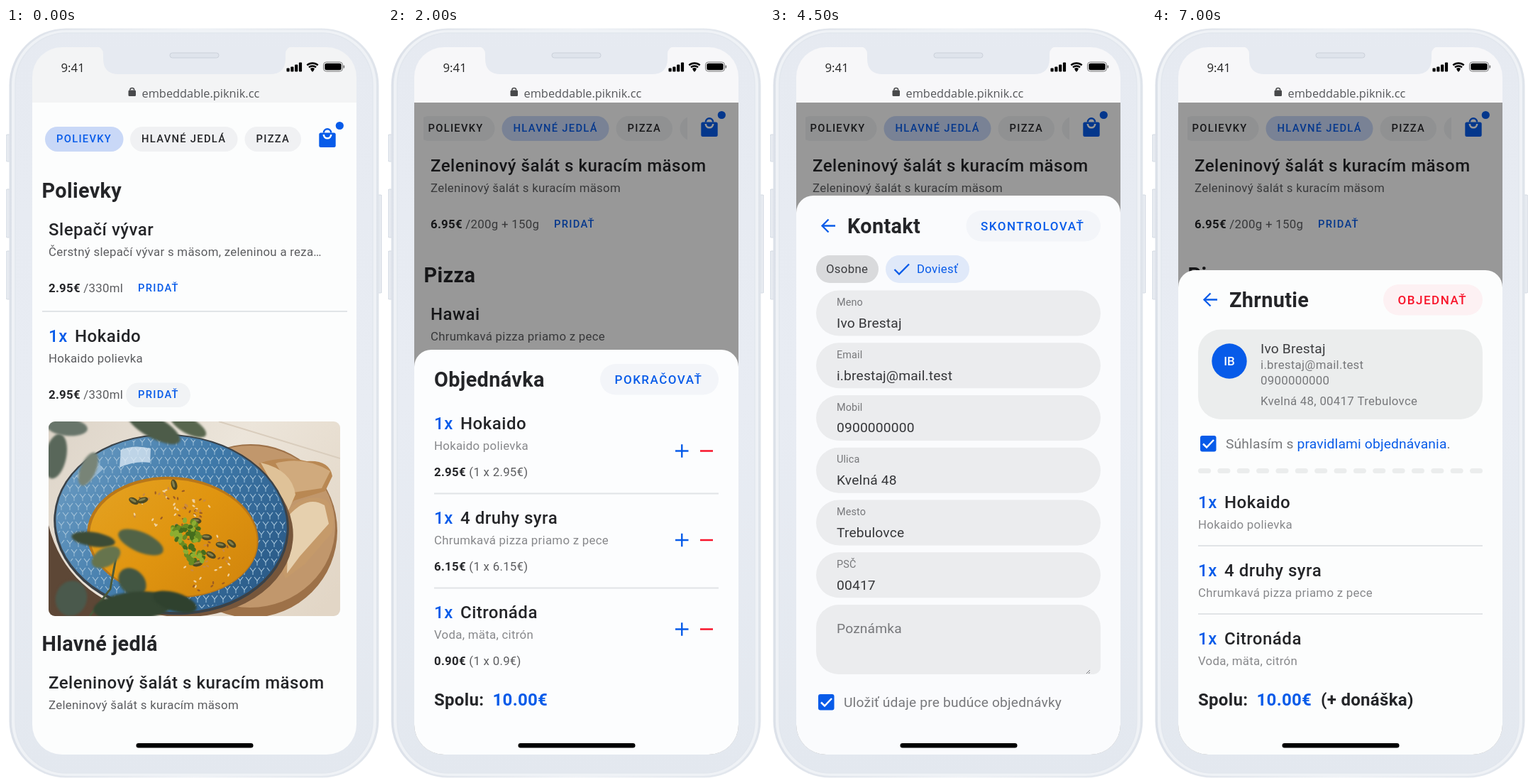
These frames come from a looping animation (530 px wide and 1056 px high, 8000 ms). An HTML page with a canvas:

```html
<!DOCTYPE html>
<html lang="sk">
<head>
<meta charset="utf-8">
<title>Objednávka</title>
<style>
html, body { margin: 0; width: 100%; height: 100%; overflow: hidden; background: #fff; }
canvas { display: block; width: 530px; height: 1056px; }
</style>
</head>
<body>
<canvas id="stage" width="530" height="1056"></canvas>
<script>
const ctx = document.getElementById('stage').getContext('2d');
const BLUE = '#075be9', RED = '#f8142a', INK = '#242528', MUTED = '#5b5c5f', PALE = '#87888b';

// [weight, size, letter spacing in em, family]
const STYLE = {
  head: [700, 28.8, .0125], title: [500, 24, .021], total: [700, 24, .0125],
  body: [400, 16.8, .0178], strong: [700, 16.8, .0178],
  chip: [500, 14.7, .089], button: [500, 17, .089],
  field: [400, 19.2, .0094], label: [400, 14.4, .009],
  initials: [500, 17, 0], bar: [400, 16.35, 0, '"Open Sans"'], clock: [400, 16.8, 0, '"Open Sans"']
};

// y is the middle of the capitals; returns the x where the text ends
function text(str, x, y, style, color = INK) {
  const [weight, size, spacing, family = 'Roboto'] = STYLE[style];
  ctx.font = `${weight} ${size}px ${family}, sans-serif`;
  ctx.letterSpacing = `${spacing * size}px`;
  ctx.fillStyle = color;
  ctx.fillText(str, x, y + size * .356);
  return x + ctx.measureText(str).width;
}

function box(x, y, w, h, r, fill) {
  ctx.beginPath();
  ctx.roundRect(x, y, w, h, r);
  if (fill) { ctx.fillStyle = fill; ctx.fill(); }
}

function oval(x, y, rx, ry, turn, fill) {
  ctx.beginPath();
  ctx.ellipse(x, y, rx, ry, turn, 0, 7);
  if (fill) { ctx.fillStyle = fill; ctx.fill(); }
}

function line(points, color, width, cap = 'butt') {
  ctx.beginPath();
  points.forEach(([x, y]) => ctx.lineTo(x, y));
  ctx.strokeStyle = color;
  ctx.lineWidth = width;
  ctx.lineCap = cap;
  ctx.stroke();
}

function arc(x, y, r, from, to, color, width) {
  ctx.beginPath();
  ctx.arc(x, y, r, from, to);
  ctx.strokeStyle = color;
  ctx.lineWidth = width;
  ctx.lineCap = 'butt';
  ctx.stroke();
}

function shape(path, fill) {
  ctx.fillStyle = fill;
  ctx.fill(new Path2D(path));
}

function gradient(x0, y0, x1, y1, ...colors) {
  const g = ctx.createLinearGradient(x0, y0, x1, y1);
  colors.forEach((c, i) => g.addColorStop(i / (colors.length - 1), c));
  return g;
}

function clipped(x, y, w, h, r, draw) {
  ctx.save();
  box(x, y, w, h, r);
  ctx.clip();
  draw();
  ctx.restore();
}

function random(seed) {
  return () => (seed = seed * 16807 % 2147483647) / 2147483647;
}

// ---- phone ----
function phoneBody() {
  ctx.fillStyle = '#fff';
  ctx.fillRect(0, 0, 530, 1056);
  for (const [x, y, h] of [[0, 150, 38], [0, 227, 68], [0, 314, 68], [523, 235, 138]]) {
    box(x, y, 7, h, 2, '#e6eaf0');
    ctx.strokeStyle = '#d5dbe3';
    ctx.lineWidth = 1;
    ctx.stroke();
  }
  box(4.5, .5, 521, 1055, 80, gradient(5, 0, 526, 0, '#dce1e9', '#eff2f6', '#dfe4eb'));
  box(8, 3, 514, 1050, 77, '#eff2f6');
  box(13, 7, 504, 1042, 73, gradient(0, 0, 0, 1056, '#e6eaf1', '#e8ecf3', '#e3e8ef'));
  ctx.strokeStyle = '#e2e7ee';
  ctx.lineWidth = 1.5;
  ctx.stroke();
}

function notch() {
  shape('M127 26 H404 Q394 27 394 37 V43 Q394 65 372 65 H159 Q137 65 137 43 V37 Q137 27 127 26Z', '#e6eaf1');
  box(231, 35, 69, 7, 3.5, '#dfe4ec');
  ctx.strokeStyle = '#cbd1db';
  ctx.lineWidth = 1;
  ctx.stroke();
}

function statusBar(fill) {
  ctx.fillStyle = fill;
  ctx.fillRect(37, 27, 457, 78);
  text('9:41', 77.5, 56.5, 'clock', '#222');
  [5, 7, 10, 13].forEach((h, i) => box(395.5 + i * 5.8, 61.5 - h, 4.2, h, 1, '#000'));
  for (const r of [4.5, 8.5, 12.5]) arc(432, 61, r - 1, -2.3, -.84, '#000', 2.5);
  shape('M432 62 L429.6 59 Q432 57 434.4 59Z', '#000');
  box(447.5, 48, 27, 13, 4);
  ctx.strokeStyle = '#777';
  ctx.lineWidth = 1;
  ctx.stroke();
  box(449.3, 49.8, 23.4, 9.4, 2.5, '#000');
  box(475.5, 52.5, 1.7, 4, 1, '#777');
  box(172.5, 87.5, 10.5, 8.5, 1.5, '#48494b');
  arc(177.75, 87.5, 3, Math.PI, 0, '#48494b', 1.6);
  text('embeddable.piknik.cc', 191.5, 91.7, 'bar', '#55575a');
}

// ---- shared widgets ----
function chip(label, x, y, w, active) {
  box(x, y - 17.5, w, 35, 17.5, active ? '#c9d8f7' : '#f0f1f3');
  text(label, x + 16, y - .3, 'chip', active ? BLUE : INK);
}

function bag(y) {
  box(441.3, y - 7.5, 23.4, 20.6, 2.5, BLUE);
  arc(453, y - 7.5, 5.2, Math.PI, 0, BLUE, 2.6);
  arc(453, y - 4.9, 5.2, 0, Math.PI, '#fcfdfd', 2.6);
  oval(470.3, y - 17.5, 5.6, 5.6, 0, BLUE);
}

function price(amount, unit, x, y) {
  return text(unit, text(`${amount}€ `, x, y, 'strong'), y, 'body', MUTED);
}

function dish(name, note, x, y, counted, noteColor = MUTED) {
  if (counted) text('1x', x, y, 'title', BLUE);
  text(name, counted ? x + 37 : x, y, 'title');
  text(note, x, y + 32, 'body', noteColor);
}

function rule(x, y, w) {
  ctx.fillStyle = '#e1e4e7';
  ctx.fillRect(x, y - 1, w, 2);
}

function sheet(top, fill) {
  ctx.fillStyle = 'rgba(0,0,0,.4)';
  ctx.fillRect(37, 105, 457, 930);
  box(37, top, 457, 1030 - top, [24, 24, 0, 0], fill);
}

function sheetHead(title, y, label, x, color, fill, back) {
  box(x, y - 21.5, 466 - x, 43.5, 21.75, fill);
  text(label, x + 20.5, y, 'button', color);
  text(title, back ? 109 : 65, y, 'head');
  if (back) {
    line([[92, y], [74, y]], BLUE, 2.3);
    line([[82.5, y - 9], [73.5, y], [82.5, y + 9]], BLUE, 2.3);
  }
}

function checkbox(y) {
  box(68, y - 11.5, 22.5, 22.5, 3, BLUE);
  line([[72, y], [77, y + 5], [87, y - 5.5]], '#fff', 2.5);
}

function total(extra = '') {
  text('Spolu:', 65, 945, 'total');
  text('10.00€', 147.5, 945, 'total', BLUE);
  text(extra, 238, 945, 'total');
}

// ---- soup picture ----
function soupPicture() {
  const rnd = random(41);
  const spread = (x, y, rx, ry) => {
    const a = rnd() * 6.28, r = Math.sqrt(rnd());
    return [x + rx * r * Math.cos(a), y + ry * r * Math.sin(a)];
  };
  ctx.fillStyle = gradient(60, 554, 440, 828, '#ddd4c8', '#ece5da', '#e2d6c6');
  ctx.fillRect(60, 554, 411, 274);
  line([[300, 554], [471, 606]], '#d9cdbd', 2);
  oval(345, 708, 122, 122, 0, '#9d7148');
  oval(344, 702, 120, 114, 0, '#c1976c');
  shape('M60 700 Q85 800 200 828 H60Z', '#5d4736');

  // bread
  shape('M356 613 Q392 601 424 610 Q456 608 460 631 L450 652 L407 665 L386 681Z', '#b98853');
  shape('M380 613 Q420 602 457 624 L445 648 L405 654Z', '#d0aa7d');
  shape('M359 612 Q403 622 408 657 L397 682 L374 639Z', '#dfc298');
  shape('M397 680 Q422 653 452 665 Q466 681 459 711 L421 755 L394 775 Q382 752 390 726Z', '#c59a6a');
  shape('M399 686 Q425 657 449 672 L455 698 L414 744 L396 768Z', '#e6d0ae');

  // bowl
  oval(243, 708, 162, 121, .08, '#76563b');
  oval(233, 699, 166, 127, .08, '#3a4249');
  oval(233, 698, 163, 124, .08, gradient(80, 600, 390, 800, '#6a9bc2', '#3f79a9', '#275683'));
  ctx.save();
  oval(233, 698, 161, 122, .08);
  ctx.clip();
  for (let row = 0; row < 21; row++) {
    for (let col = 0; col < 30; col++) {
      const x = 66 + col * 12 + row % 2 * 6, y = 570 + row * 13;
      line([[x - 4, y - 5], [x, y], [x + 4, y - 5]], '#a3c2d8', 1.2);
      line([[x, y], [x, y + 5]], '#8fb5d0', 1.2);
    }
  }
  ctx.restore();
  shape('M162 594 Q180 586 204 592 L203 612 Q181 609 160 619Z', 'rgba(224,237,247,.75)');
  shape('M98 631 L126 606 L137 621 L113 643Z', 'rgba(210,229,243,.45)');
  oval(235, 717, 121, 85, .08, '#b8771a');
  oval(236, 718, 118, 82, .08, gradient(150, 640, 300, 800, '#e3a01f', '#e09510', '#d4880d'));

  // seeds and herbs
  for (let i = 0; i < 90; i++) {
    const [x, y] = i < 55 ? spread(232, 677, 58, 29) : spread(280, 752, 38, 42);
    oval(x, y, 2.3, 1.2, rnd() * 3, ['#f0d2a0', '#9c5c23', '#c98845'][i % 3]);
  }
  for (const [x, y, turn] of [[180, 666, .5], [193, 665, -.3], [237, 643, 1.3], [283, 717, .1], [318, 726, .7],
    [270, 754, -.2], [289, 742, .5], [303, 728, .2], [268, 694, .1]]) {
    oval(x, y, 7.5, 4.2, turn, '#4d4a25');
    oval(x - 1, y - 1, 5, 1.6, turn, '#85804a');
  }
  for (let i = 0; i < 65; i++) {
    const [x, y] = i < 45 ? spread(254, 712, 21, 20) : spread(266, 742, 17, 13);
    oval(x, y, 4, 3, rnd() * 3, ['#688b22', '#8cae31', '#456d1d'][i % 3]);
  }

  // leaves in front
  line([[157, 735], [147, 790], [118, 828]], '#4b5939', 3);
  ctx.filter = 'blur(1.5px)';
  for (const [x, y, rx, ry, turn, color] of [
    [123, 720, 31, 10, .15, '#3c4b35'], [190, 724, 34, 14, .4, '#526346'], [141, 745, 22, 13, -.5, '#66744d'],
    [178, 780, 22, 17, .8, '#425642'], [180, 814, 57, 20, -.1, '#344632'], [92, 803, 22, 25, .3, '#4a594c'],
    [238, 808, 32, 13, .3, '#2f412e'], [70, 603, 15, 32, .2, '#59675a'], [86, 562, 29, 12, .1, '#68756a'],
    [116, 621, 11, 25, .4, '#788477'], [208, 562, 42, 15, .5, '#4d5c49'], [257, 560, 28, 11, .5, '#58664e']
  ]) oval(x, y, rx, ry, turn, color);
  ctx.filter = 'none';
}

// ---- screens ----
function menuTop() {
  ctx.fillStyle = '#fcfdfd';
  ctx.fillRect(37, 105, 457, 930);
  chip('POLIEVKY', 55, 156.5, 110.5, true);
  chip('HLAVNÉ JEDLÁ', 175, 156.5, 151.5);
  chip('PIZZA', 336.5, 156.5, 79.5);
  bag(155);
  text('Polievky', 50.5, 229, 'head');
  dish('Slepačí vývar', 'Čerstný slepačí vývar s mäsom, zeleninou a reza…', 60, 283);
  price('2.95', '/330ml', 60, 366);
  text('PRIDAŤ', 186, 366, 'chip', BLUE);
  rule(51, 399, 430);
  dish('Hokaido', 'Hokaido polievka', 60, 433, true);
  price('2.95', '/330ml', 60, 516);
  box(169, 499.5, 91, 34.5, 17.25, '#f1f3f5');
  text('PRIDAŤ', 186, 516, 'chip', BLUE);
  clipped(60, 554, 411, 274, 9, soupPicture);
  text('Hlavné jedlá', 50.5, 867, 'head');
  dish('Zeleninový šalát s kuracím mäsom', 'Zeleninový šalát s kuracím mäsom', 60, 921);
}

function menuScrolled() {
  ctx.fillStyle = '#fcfdfd';
  ctx.fillRect(37, 105, 457, 930);
  clipped(50, 110, 372, 60, 0, () => {
    chip('POLIEVKY', 40.5, 141.5, 110);
    chip('HLAVNÉ JEDLÁ', 160.5, 141.5, 151, true);
    chip('PIZZA', 321.5, 141.5, 79.5);
    chip('', 411.5, 141.5, 90);
  });
  bag(140);
  dish('Zeleninový šalát s kuracím mäsom', 'Zeleninový šalát s kuracím mäsom', 60, 193);
  price('6.95', '/200g + 150g', 60, 276);
  text('PRIDAŤ', 234, 276, 'chip', BLUE);
  text('Pizza', 50.5, 348, 'head');
  dish('Hawai', 'Chrumkavá pizza priamo z pece', 60, 402);
}

const ORDER = [
  ['Hokaido', 'Hokaido polievka', '2.95', '2.95'],
  ['4 druhy syra', 'Chrumkavá pizza priamo z pece', '6.15', '6.15'],
  ['Citronáda', 'Voda, mäta, citrón', '0.90', '0.9']
];

function cart() {
  menuScrolled();
  sheet(453, '#fcfdfe');
  sheetHead('Objednávka', 494.5, 'POKRAČOVAŤ', 299, BLUE, '#f3f5f9');
  ORDER.forEach(([name, note, sum, each], i) => {
    const y = 556 + i * 133, mid = 595.5 + i * 125.5;
    dish(name, note, 65, y, true, PALE);
    price(sum, `(1 x ${each}€)`, 65, y + 69);
    if (i < 2) rule(65, y + 99.5, 401);
    line([[405, mid], [423.5, mid]], BLUE, 2.4);
    line([[414.25, mid - 9.25], [414.25, mid + 9.25]], BLUE, 2.4);
    line([[440, mid], [458, mid]], RED, 2.4);
  });
  total();
}

const PERSON = {
  name: 'Ivo Brestaj', initials: 'IB', email: 'i.brestaj@mail.test',
  phone: '0900000000', street: 'Kvelná 48', town: 'Trebulovce', zip: '00417'
};

function contact() {
  menuScrolled();
  sheet(236, '#fafbfd');
  sheetHead('Kontakt', 278.5, 'SKONTROLOVAŤ', 276.5, BLUE, '#f3f5f9', true);
  box(65, 320, 88, 39, 19.5, '#d9dadc');
  text('Osobne', 79, 339, 'body', '#3c3d40');
  box(163, 320, 118, 39, 19.5, '#e0e9f9');
  line([[175.5, 340], [182, 346.5], [196, 332.5]], BLUE, 2.3);
  text('Doviesť', 207, 339, 'body', BLUE);
  const fields = [['Meno', PERSON.name], ['Email', PERSON.email], ['Mobil', PERSON.phone],
    ['Ulica', PERSON.street], ['Mesto', PERSON.town], ['PSČ', PERSON.zip]];
  fields.forEach(([label, value], i) => {
    const y = 369.5 + i * 73.75;
    box(65, y, 401, 64, 32, '#ebecee');
    text(label, 94, y + 16.5, 'label', '#77787b');
    text(value, 94, y + 45.5, 'field', '#353639');
  });
  box(65, 812, 401, 98, [32, 32, 10, 32], '#ebecee');
  text('Poznámka', 94, 845.5, 'field', '#77787b');
  line([[446, 909], [451, 904]], '#77787b', 1);
  line([[449, 909], [451, 907]], '#77787b', 1);
  checkbox(949.5);
  text('Uložiť údaje pre budúce objednávky', 104, 949, 'field', '#77787b');
}

function summary() {
  menuScrolled();
  sheet(341, '#fcfdfd');
  sheetHead('Zhrnutie', 382.5, 'OBJEDNAŤ', 326, RED, '#fdf1f3', true);
  box(65, 424.5, 401, 126.5, 32, '#ebeded');
  oval(109, 469, 24.7, 24.7, 0, BLUE);
  ctx.textAlign = 'center';
  text(PERSON.initials, 109, 469, 'initials', '#fff');
  ctx.textAlign = 'left';
  text(PERSON.name, 153, 451, 'field', '#3c3d40');
  text(PERSON.email, 153, 474, 'body', '#77787b');
  text(PERSON.phone, 153, 496, 'body', '#77787b');
  text(`${PERSON.street}, ${PERSON.zip} ${PERSON.town}`, 153, 525.5, 'body', '#77787b');
  checkbox(585.5);
  const link = text('Súhlasím s ', 104, 585, 'field', '#77787b');
  text('.', text('pravidlami objednávania', link, 585, 'field', BLUE), 585, 'field', '#77787b');
  for (let i = 0; i < 15; i++) box(65 + i * 27.36, 620, 18, 7, 3.5, '#ebeded');
  ORDER.forEach(([name, note], i) => {
    const y = 667 + i * 96;
    dish(name, note, 65, y, true, PALE);
    if (i < 2) rule(65, y + 62, 401);
  });
  total('(+ donáška)');
}

const SCENES = [[500, menuTop], [3000, cart], [5500, contact], [8000, summary]];
let shown;

function render() {
  const t = performance.now() % 8000;
  const scene = SCENES.find(([end]) => t < end)[1];
  if (scene !== shown) {
    shown = scene;
    phoneBody();
    clipped(37, 27, 457, 996, 42, () => {
      scene();
      statusBar(scene === menuTop ? '#f3f4f5' : '#f7f7f9');
      box(183.5, 1007, 165, 6.5, 3.25, '#000');
    });
    notch();
  }
  requestAnimationFrame(render);
}
render();
</script>
</body>
</html>
```
